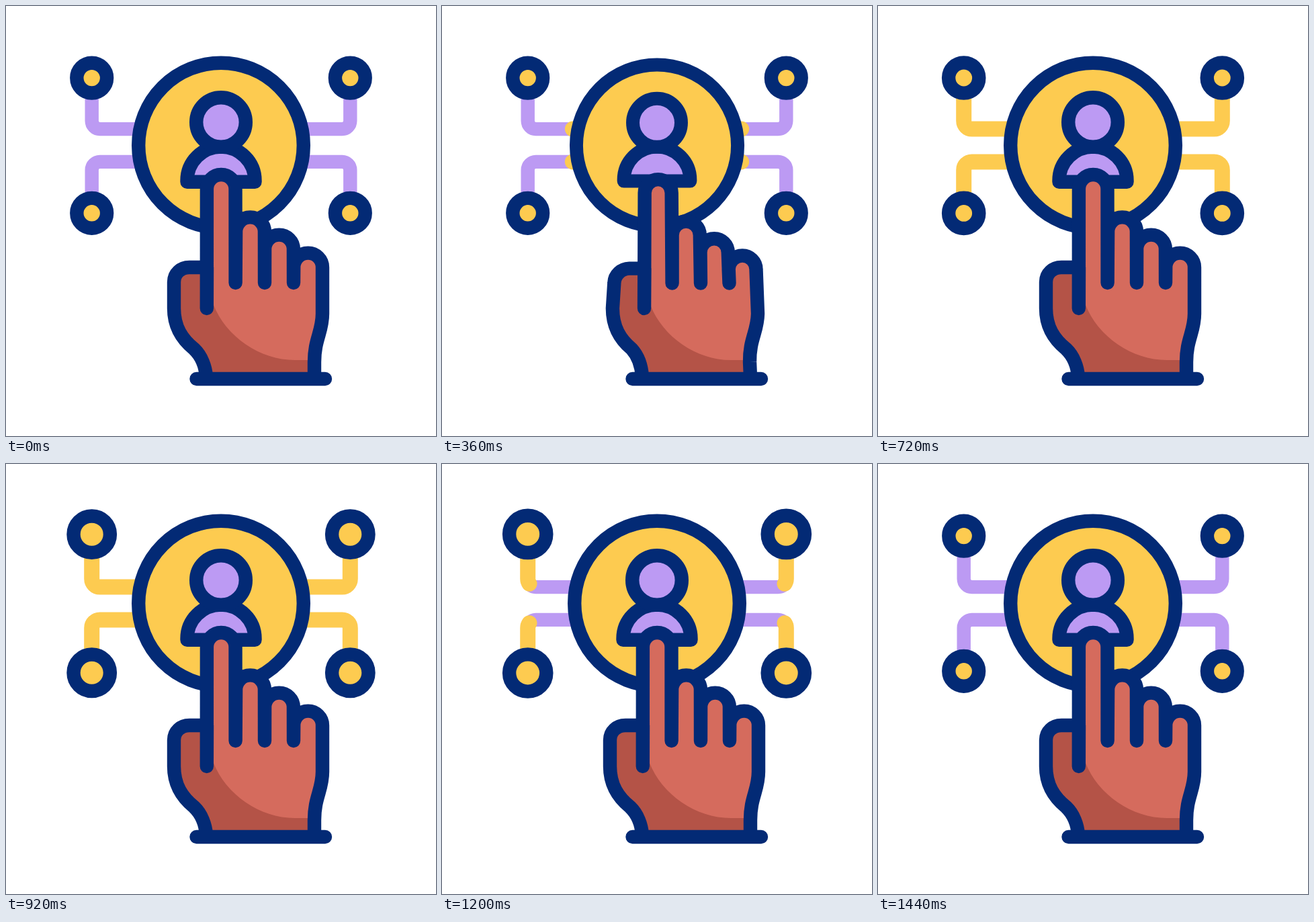
Recreate the animation shown at these times as an HTML page with a canvas. Size 640x640 px, loop 1.48 s.

```html
<!DOCTYPE html>
<html lang="en">
<head>
<meta charset="utf-8">
<title>Tap to connect</title>
<style>
  html, body { margin: 0; width: 100%; height: 100%; overflow: hidden; background: #fff; }
  canvas { display: block; width: 100vmin; height: 100vmin; }
</style>
</head>
<body>
<canvas id="stage" width="640" height="640"></canvas>
<script>
const ctx = document.getElementById('stage').getContext('2d');
const LOOP = 1480, STEP = 40, LINE = 20.4;
const NAVY = '#032a75', YELLOW = '#fdcb50', PURPLE = '#bc9af3';
const SKIN = '#d56b5d', SHADE = '#b45347';

const clamp = v => Math.min(1, Math.max(0, v));
const linear = (t, from, to) => clamp((t - from) / (to - from));
const ease = (t, from, to) => {
  const u = linear(t, from, to);
  return u * u * (3 - 2 * u);
};
const pulse = (t, from, peak, to) => ease(t, from, peak) - ease(t, peak, to);

function paint(path, fill) {
  ctx.fillStyle = fill;
  ctx.fill(path);
  ctx.lineWidth = LINE;
  ctx.strokeStyle = NAVY;
  ctx.stroke(path);
}

function disc(x, y, r, fill) {
  const path = new Path2D();
  path.arc(x, y, r, 0, Math.PI * 2);
  paint(path, fill);
}

// Runs f in all four corners; side and level are -1 or 1.
function eachCorner(f) {
  for (const side of [-1, 1]) for (const level of [-1, 1]) f(side, level);
}

function drawLinks(t) {
  const length = 150;
  const head = length * linear(t, 322, 773);
  const tail = length * linear(t, 964, 1415);
  eachCorner((side, level) => {
    const x = 320 + side * 192.3, y = 207.5 + level * 24.4;
    const path = new Path2D();
    path.moveTo(320 + side * 113, y);
    path.arcTo(x, y, x, y + level * 76, 12);
    path.lineTo(x, y + level * 76);
    ctx.lineWidth = LINE;
    ctx.strokeStyle = PURPLE;
    ctx.stroke(path);
    if (head > tail) {
      ctx.setLineDash([head - tail, 999]);
      ctx.lineDashOffset = -tail;
      ctx.lineWidth = 23;
      ctx.strokeStyle = YELLOW;
      ctx.stroke(path);
      ctx.setLineDash([]);
    }
  });
}

function drawNodes(t) {
  const grow = pulse(t, 680, 1095, 1368);
  eachCorner((side, level) => {
    const y = 207.7 + level * (100.6 + 4 * grow);
    disc(320 + side * 192.3, y, 22.4 + 7.8 * grow, YELLOW);
  });
}

function drawBadge(t) {
  const scale = 1 - 0.049 * pulse(t, 280, 450, 620);
  ctx.save();
  ctx.translate(320, 207.5);
  ctx.scale(scale, scale);
  disc(0, 0, 122.8, YELLOW);
  const body = new Path2D();
  body.moveTo(-50.5, 54.3);
  body.arc(0, 52.5, 50.5, Math.PI, 0);
  body.lineTo(50.5, 54.3);
  body.closePath();
  paint(body, PURPLE);
  disc(0, -34.5, 36.8, PURPLE);
  ctx.restore();
}

// Each finger: centre x, centre y, radius, right line foot x, then their shifts.
const FINGERS = [
  [320.2, 272.3, 21.3, 341.6, 1.5, 6, -1.3, 1],
  [363.5, 335.8, 21.4, 385, -0.3, 5.5, -0.8, 0],
  [406.5, 362, 21.4, 428, -1.4, 5, -0.8, -0.5],
  [449.6, 389, 21.4, 471, -2.6, 3, -1, -1]
];

function drawHand(t) {
  const bend = 1.58 * pulse(t, 90, 280, 470);
  const at = (v, shift) => v + shift * bend;

  const hand = new Path2D();
  hand.moveTo(298, 552);
  hand.bezierCurveTo(297, 537, at(291, 1), 521, at(280, 2.5), 510.5);
  hand.bezierCurveTo(at(262, 3), 496, at(250, 4), 478, at(250, 4), 450);
  hand.lineTo(at(250, 6.5), at(411, 1));
  hand.bezierCurveTo(at(250, 7), at(398, 2), at(260, 7), at(389, 2), at(273, 6), at(389, 1.7));
  hand.lineTo(at(299, 2.5), at(389, 1.7));
  hand.lineTo(at(298.8, 2.3), 450);
  FINGERS.forEach(([x, y, r, foot, dx, dy, dr, df], i) => {
    hand.arc(at(x, dx), at(y, dy), at(r, dr), Math.PI, 0);
    if (i < 3) hand.lineTo(at(foot, df), at(412, 0.6));
  });
  hand.lineTo(at(471, -1), 458);
  hand.bezierCurveTo(at(471, -1.5), 485, at(459, -1.5), 496, at(459, -1), 530);
  hand.lineTo(459, 552);

  ctx.fillStyle = SKIN;
  ctx.fill(hand);
  ctx.save();
  ctx.clip(hand);
  ctx.fillStyle = SHADE;
  ctx.beginPath();
  ctx.moveTo(at(299, 2.5), 380);
  ctx.lineTo(at(299, 2.5), 420);
  ctx.lineTo(at(308.5, 2), at(444, 2));
  ctx.bezierCurveTo(at(327, 2), 492, 378, 527, 430, 527);
  ctx.lineTo(470, 527);
  ctx.lineTo(470, 560);
  ctx.lineTo(230, 560);
  ctx.lineTo(230, 380);
  ctx.fill();
  ctx.restore();

  hand.moveTo(283.5, 555);
  hand.lineTo(475, 555);
  ctx.lineWidth = LINE;
  ctx.strokeStyle = NAVY;
  ctx.stroke(hand);
}

function draw(now) {
  const t = Math.floor((now % LOOP) / STEP) * STEP;
  ctx.fillStyle = '#fff';
  ctx.fillRect(0, 0, 640, 640);
  ctx.lineCap = ctx.lineJoin = 'round';
  drawLinks(t);
  drawBadge(t);
  drawNodes(t);
  drawHand(t);
}

let start;
function tick(now) {
  start ??= now;
  draw(now - start);
  requestAnimationFrame(tick);
}
draw(0);
requestAnimationFrame(tick);
</script>
</body>
</html>
```
